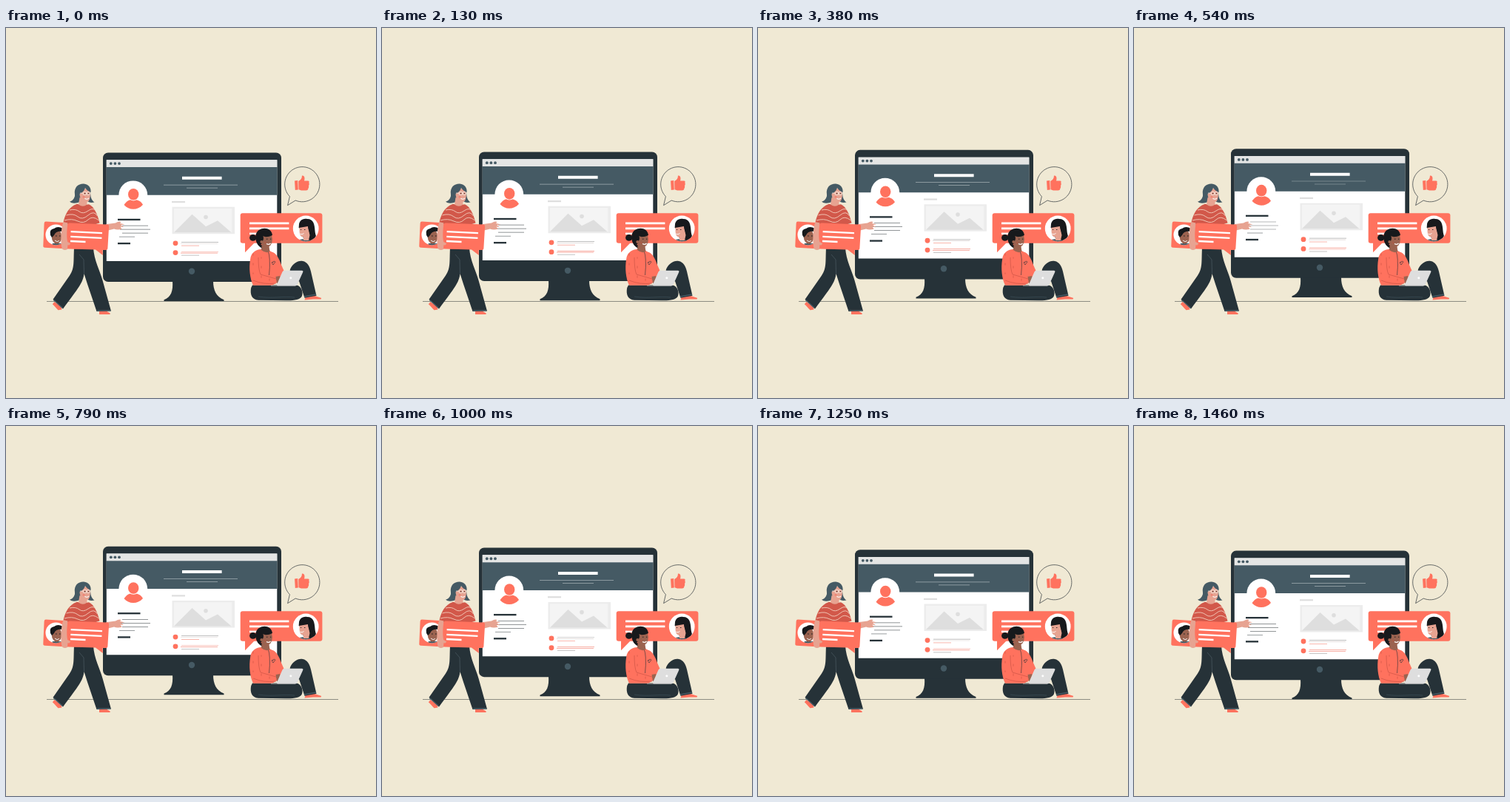
These frames come from a looping animation (500 px wide and 500 px high, 1.5 s). An HTML page with a canvas:

```html
<!DOCTYPE html>
<html lang="en">
<head>
<meta charset="utf-8">
<title>Floating monitor</title>
<style>
html, body { margin: 0; width: 100%; height: 100%; overflow: hidden; background: #f0e9d4; }
canvas { display: block; width: 500px; height: 500px; }
</style>
</head>
<body>
<canvas id="stage" width="500" height="500"></canvas>
<script>
const ctx = document.getElementById('stage').getContext('2d');
const LOOP = 1500, RISE = 6.4, LEAD = 45;
const BG = '#f0e9d4', DARK = '#263238', SLATE = '#455a64', CORAL = '#ff725e',
      DEEP = '#d2584a', WHITE = '#ffffff', SKIN = '#e7a391', BROWN = '#9b6350', HAIR = '#17191c';

function shape(d, color) {
  ctx.fillStyle = color;
  ctx.fill(new Path2D(d));
}
function stroke(d, color, width = 0.6) {
  ctx.strokeStyle = color;
  ctx.lineWidth = width;
  ctx.stroke(new Path2D(d));
}
function box(x, y, w, h, color, r = 0) {
  ctx.fillStyle = color;
  ctx.beginPath();
  ctx.roundRect(x, y, w, h, r);
  ctx.fill();
}
function oval(x, y, rx, color, ry = rx) {
  ctx.fillStyle = color;
  ctx.beginPath();
  ctx.ellipse(x, y, rx, ry, 0, 0, Math.PI * 2);
  ctx.fill();
}
function clipped(x, y, r, draw) {
  ctx.save();
  ctx.beginPath();
  ctx.arc(x, y, r, 0, Math.PI * 2);
  ctx.clip();
  draw();
  ctx.restore();
}
const rule = (x1, x2, y, color) => box(x1, y, x2 - x1, 0.7, color);

function drawMonitor() {
  shape('M225 342 C226 356 223 364 213.5 367.5 V369.3 H294.5 V367.5 C284 363 280 355 280 342Z', DARK);
  box(131, 168.6, 241, 174.6, DARK, 7);
  oval(251, 329, 4.2, SLATE);

  box(135.8, 178.4, 230.5, 136.8, WHITE);
  box(135.8, 178.4, 230.5, 9.8, '#e4e5e4');
  for (let i = 0; i < 3; i++) oval(141.8 + i * 5.6, 183.3, 1.9, SLATE);
  box(135.8, 188.2, 230.5, 37.8, SLATE);
  box(238, 201, 53.6, 4, WHITE);
  rule(213, 313, 212, '#a3aeb3');
  rule(244, 286, 216, '#a3aeb3');

  oval(171.8, 226, 19.4, WHITE);
  shape('M159.5 239.2 C163 234.3 166 232 172 232 C178 232 182 234 185 239 C178 247 166 247 159.5 239.2Z', CORAL);
  oval(172.2, 225, 8, WHITE, 8.6);
  oval(172.2, 225, 7.2, CORAL, 7.8);

  box(151, 258, 30.5, 2.3, DARK);
  box(151, 290.2, 17, 2.3, DARK);
  [[157, 192, 267], [154, 195, 272], [157, 192, 277], [153, 174, 282]]
    .forEach(([a, b, y]) => rule(a, b, y, '#6c7275'));

  box(224, 234.2, 18, 2.2, '#dedede');
  box(224.5, 242, 84.5, 36.5, '#ececec');
  box(227, 244.2, 78.3, 32.3, '#f4f4f4');
  shape('M227 276.5 L251.5 252 L270 268.5 L286 260.5 L304.5 276.5Z', '#dedede');
  oval(270, 255.7, 2.8, '#dedede');

  oval(229, 291, 3.4, CORAL);
  oval(229, 303.8, 3.4, CORAL);
  rule(237, 287, 289.2, '#a9a9a9');
  rule(236, 286, 291.1, '#d9d2d0');
  rule(237, 261, 294, '#f59587');
  rule(237, 287, 302.1, '#f59587');
  rule(236, 286, 304, '#f59587');
  rule(237, 261, 307, '#a9a9a9');
}

function drawThumbBubble() {
  const outline = 'M383.4 227.7 A23.6 23.6 0 1 1 391.2 233 L380.6 239.6 Z';
  shape(outline, BG);
  stroke(outline, '#3a4144', 0.75);
  shape('M390 206.5 L394.2 206 L394.8 218.5 L390.8 219Z', CORAL);
  shape('M395.2 207 C398 205.8 400 203.5 400 199.6 C402.8 198.7 404.4 202 403 206.6 H408 C409.8 206.6 410 208 409.3 209 C410 210.5 409.8 212 409 213 C409.5 215 409 216 408.3 217 C408.2 218.9 407 219.4 405.5 219.4 H399 L395.5 218.3Z', CORAL);
}

function drawCards() {
  shape('M54 261.6 L86 263.5 L84 298.5 L52.5 296.8 Q50 296.6 50.3 294 L51.6 264 Q51.8 261.5 54 261.6Z', CORAL);
  oval(67.5, 279.4, 14, WHITE);
  clipped(67.5, 279.4, 14, () => {
    shape('M59 298 L63 291 H76 L82 298Z', SLATE);
    oval(68.5, 282, 6.8, BROWN, 9.5);
    shape('M60 280 Q58 272 65 271 Q70 267 77 271 V275 Q67 274 65 280 L62 283Z', HAIR);
    stroke('M66 287 Q69 290 72 287.5', WHITE, 0.9);
    stroke('M67 281h1.6M72 281h1.6', HAIR, 1);
  });

  box(316.7, 250.2, 110.7, 40.6, CORAL, 3);
  shape('M323 289 V303.3 L336 290Z', CORAL);
  box(329, 262.6, 53.4, 2.6, WHITE);
  box(329, 269.6, 53.4, 2.6, WHITE);
  box(329, 276.6, 23, 2.6, WHITE);
  oval(405.2, 271, 17.4, WHITE);
  clipped(405.2, 271, 17.2, () => {
    shape('M396 269 C395 260 401 257 407 258 C416 258 417 266 417.5 274 C418 281 421 284 420 287 L404 289Z', HAIR);
    shape('M390 290 C393 286 398 285.5 403 285 L410 286 L418 292Z', SLATE);
    shape('M396.5 267 Q403 261 408 268 L410.5 280 L409 287 H402 V282.5 C398 283 396.4 279 396.5 272Z', SKIN);
    shape('M395.6 270 Q396 259 406 259 Q415 262 413 279 Q409 277 408 268 Q402 269 395.6 270Z', HAIR);
    stroke('M397.4 278.2 Q400 280 402.5 277.5', WHITE, 0.9);
    stroke('M398 272.5h1.2M403 272.5h1.4', HAIR, 0.9);
  });
}

function drawWalker() {
  // legs and feet
  shape('M65.5 370 L62.8 373.2 C65 375 67.5 378 70.5 381.3 L75.5 380.4 L74 376Z', CORAL);
  shape('M126 382.5 L126 387 H140.3 Q142 385.3 138 384 L134 381Z', CORAL);
  shape('M92 297 L118 297 C119 314 127 328 130.5 341 L142 382.5 L122.5 383 L110 346 L105.5 332 C104 344 99 350 77 379.5 L63.5 366.8 L86 334.5 C93 324 91 316 92 297Z', DARK);
  stroke('M64.3 367.5 L76.5 378.5M123 382 L141.4 381.8', SLATE, 1.5);
  stroke('M105.5 332 L105 313 L99 306', '#5a6b73', 0.5);

  // torso
  shape('M96 237.8 Q104 240 112 238.2 C119 241 124 252 126.5 263.5 L118 266 V298.5 H92 L91 268 L77.5 262.5 C80 252 84 242 96 237.8Z', DEEP);
  stroke('M86 246 Q94 244 99 248 T111 247 T121 247M81.5 253 Q91 250 97 255 T111 253 T123.5 254M79 260 Q89 257 97 261 T111 259 T125.5 260', '#f3cdbd', 0.9);

  // hair, neck and face
  shape('M94 222 C93 230 91 233 86 234.8 Q90 238 97 236 L108 232 Q112 237.5 119.5 235.6 C115 232 114 228 114 220Z', SLATE);
  shape('M99.5 229 L98 238.5 Q104 243 109.5 238.5 L109 230Z', SKIN);
  shape('M99 221 Q105 213 113.3 220 C114.7 227 113.5 234.8 109 235.4 C103 235.5 99 230 99 221Z', SKIN);
  shape('M93 225 C91.5 215 98 210.2 105 210.5 C112 211 115.5 217 114.5 222 Q110 220.5 107 216 Q105 222 99.5 224 L99 231 Q97 235 93 235Z', SLATE);
  stroke('M100 223 L104 223.3 M104 223.5 a2.5 2.3 0 1 0 5 0 a2.5 2.3 0 1 0 -5 0 M109 223.5 a2.2 2.3 0 1 0 4.4 0 a2.2 2.3 0 1 0 -4.4 0', '#f4eee5', 0.8);
  stroke('M106 223.6h1.2M110.8 223.6h1.1', HAIR, 1);
  stroke('M106.5 230.3 Q109.5 232.5 112 229.8', WHITE, 1.1);
  oval(105, 228.3, 1.5, '#ef8676');

  // reaching hand
  shape('M135 265.2 L148 263.6 Q153 260.5 155.5 262.2 L154 264 L160.3 265.2 L155.2 266.3 L159.2 269.2 L154.5 268.6 L156.6 271.8 Q150 273.2 146 271.4 L136 274Z', SKIN);

  // carried card
  shape('M86 263.5 L136.5 265.6 Q139.3 265.8 139.1 268.5 L137.4 297.5 Q137.2 300.2 134.5 300.1 L130.6 299.9 L130.8 307 L121 299.6 L84.5 298.4 Q82.2 298 82.2 295.5 L83.2 266 Q83.4 263.4 86 263.5Z', CORAL);
  stroke('M87.6 275.2 L130 277.2M87.3 281.8 L129.4 283.8M87 288 L107.5 289', WHITE, 2.3);

  // near arm
  shape('M77.3 262 L83.4 263.5 C82.2 274 81.8 282 83.2 289 L87.3 291.2 L85.5 293.5 L83.4 293.3 L83 299 Q78.5 301.2 75.5 298 C73.5 286 74.2 273 77.3 262Z', SKIN);
}

function drawSitter() {
  // far leg and foot
  shape('M405 362.5 L414 361 L425.8 364.7 Q427 366.4 424 366.5 L415 366.6 L403.5 367.6Z', CORAL);
  shape('M384 326 C388 318 394 314 401 315 C407 316 410.5 322 412 329 L419.5 361.7 L403.5 364.8 L396 342 L380 350Z', DARK);
  stroke('M403 363 L419 360', SLATE, 1.4);
  // folded leg
  shape('M333 347.5 H392 C399 348 402 357 400 362 C398 367.5 388 368.5 378 368.2 L341 367.7 C332 367 329.5 360 331.2 351Z', DARK);
  stroke('M341 363 C360 366 375 362 390 364', SLATE, 0.5);

  // jacket
  shape('M341 299.5 Q351 297 359 302.5 C365 304 369 311 372 320 L375.5 328 L367.5 343 L360 347.8 H334 C329.5 338 328 325 330.2 312 C331 305 335 301.5 341 299.5Z', CORAL);
  stroke('M341 310 Q341 327 344 333 L365 339M334 341 Q348 347 365 345', DEEP, 0.8);
  stroke('M354 301 Q358 311 355.5 334', DARK, 0.6);
  stroke('M359 317 l2 3 l3 -4 q-3 -2 -3 1 q-1 -2 -2 0', DARK, 0.6);
  for (let i = 0; i < 24; i++) {
    oval(334 + (i * 11) % 33, 305 + (i * 17) % 38, 0.55, DEEP);
  }

  // head
  oval(333.7, 283.4, 4.6, HAIR, 4.4);
  shape('M345 290 V300 Q351 305 356.5 302 L355 292Z', BROWN);
  oval(352.3, 285.5, 7.6, BROWN, 10.8);
  shape('M344 296.5 C336 291 335 277 342 273 C349 268.5 359 271 360 280 Q352 284 347.5 281 Q349 287 345.5 289 V297Z', HAIR);
  oval(345.3, 289, 2, BROWN);
  stroke('M352 285.2h1.4M357 285.2h1.2', HAIR, 1);
  stroke('M352 291.5 Q355 293.6 357.5 291', WHITE, 1.2);
  oval(350, 290, 1.5, '#a95c49');
  oval(345.2, 292.5, 0.7, CORAL);

  // laptop and hand
  shape('M364.5 336 L370 335 L372 342 L366 345.2Z', BROWN);
  shape('M376 327.8 H399.7 Q402 327.8 401.2 330 L393.6 346.7 Q392.8 348.4 391 348.4 H367 Q365.3 348 366.3 346 L373.5 329.6 Q374.4 327.8 376 327.8Z', '#dedede');
  stroke('M358 348.2 H391', '#b7b7b7', 0.8);
  oval(384.8, 337.7, 1.5, WHITE);
}

function lift(ms) {
  const p = ((ms + LEAD) % LOOP) / LOOP;
  const wave = (1 - Math.cos(p * Math.PI * 2)) / 2;
  const ramp = 1 - Math.abs(2 * p - 1);
  return RISE * (wave + ramp) / 2;
}

function render(ms) {
  box(0, 0, 500, 500, BG);
  rule(55, 449, 369.1, '#6d6f69');
  ctx.save();
  ctx.translate(0, -lift(ms));
  drawMonitor();
  ctx.restore();
  drawThumbBubble();
  drawCards();
  drawWalker();
  drawSitter();
}

let start;
function tick(now) {
  start ??= now;
  render(now - start);
  requestAnimationFrame(tick);
}
render(0);
requestAnimationFrame(tick);
</script>
</body>
</html>
```
